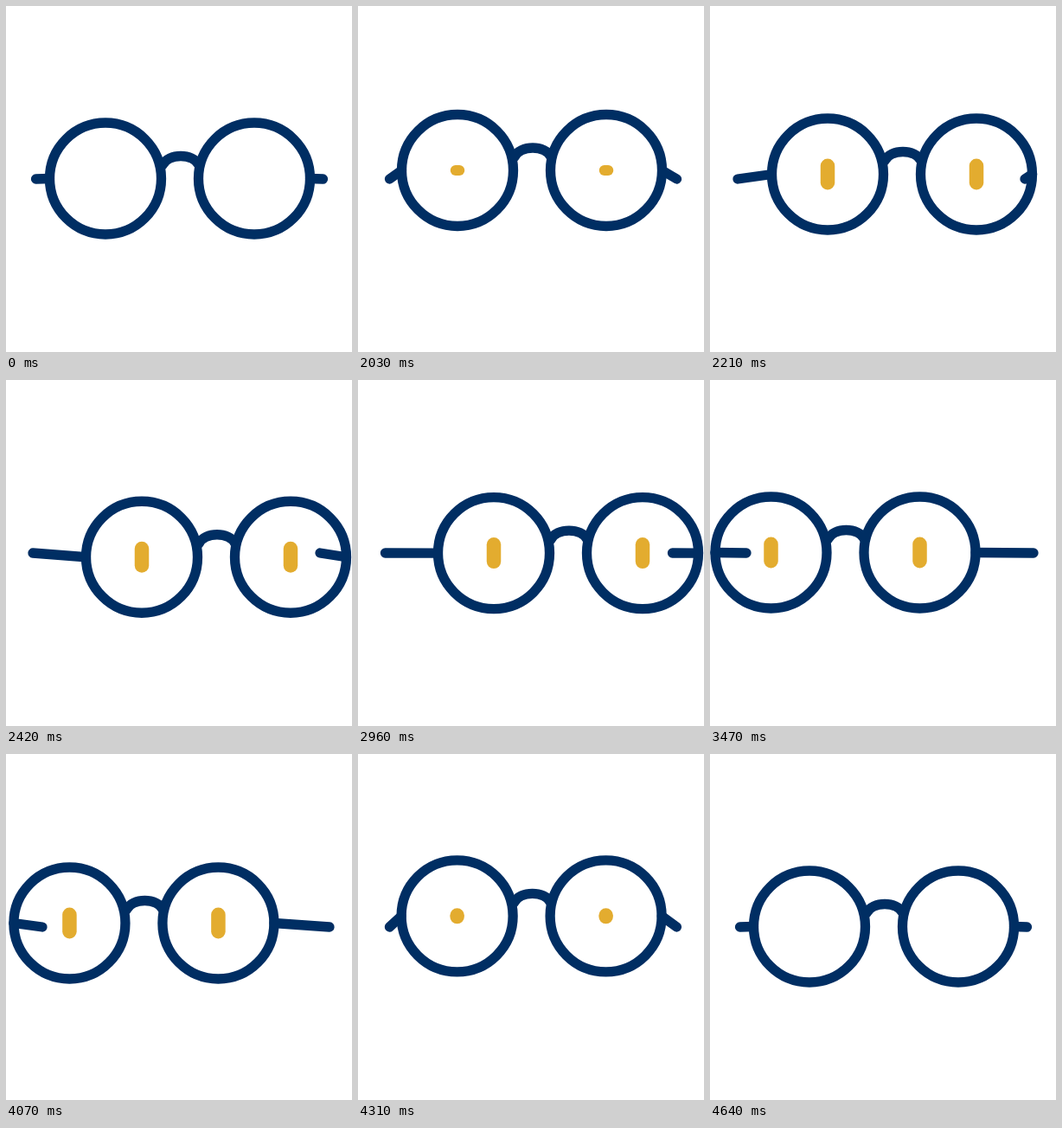
Write an HTML page that moves like this. It is 400 px wide and 400 px high and loops after 4.67 s.

```html
<!DOCTYPE html>
<html>
<head>
<meta charset="utf-8">
<style>
html, body { margin: 0; height: 100%; overflow: hidden; background: #fff; }
svg { display: block; width: 100vw; height: 100vh; }
</style>
</head>
<body>
<svg viewBox="0 0 400 400">
  <g fill="none" stroke="#002e63" stroke-width="11.3" stroke-linecap="round">
    <g id="frame">
      <circle cx="115" cy="199.5" r="64.5"/>
      <circle cx="287" cy="199.5" r="64.5"/>
      <path d="M181 184C187 170 217 170 223 184"/>
    </g>
    <path id="arms"/>
  </g>
  <g fill="#e3ac2f">
    <rect class="pupil" width="16.5"/>
    <rect class="pupil" width="16.5"/>
  </g>
</svg>
<script>
const LOOP = 4670, START = 2030, STEP = 30;
const frame = document.getElementById('frame');
const arms = document.getElementById('arms');
const pupils = document.querySelectorAll('.pupil');

// Keys are [step, value]
const lift = [[-1, 0], [0, -9.5], [2, -22], [6, -5], [9, 10.5], [17, 0], [30, 0],
  [38, 13.5], [40, 10.5], [43, -5], [48, 0], [62, 0], [68, -4], [73, -22],
  [80, 6], [81, 7], [87, 0]];
const ears = [[-1, 0], [0, 2], [6, -2.5], [9, -4], [17, -3], [30, -3], [40, -4],
  [48, 7.5], [68, 7.5], [80, 0]];
const open = [[-1, 0], [0, 12], [2, 36], [35, 36], [38, 10], [40, 28], [42, 36],
  [74, 36], [78, 0]];

// Smooth curve through the keys, without overshoot
function curve(keys, x) {
  const last = keys.length - 1;
  if (x <= keys[0][0]) return keys[0][1];
  if (x >= keys[last][0]) return keys[last][1];
  const slope = i => i < 0 || i >= last ? 0 :
    (keys[i + 1][1] - keys[i][1]) / (keys[i + 1][0] - keys[i][0]);
  const tangent = i => {
    const a = slope(i - 1), b = slope(i);
    return a * b > 0 ? 2 * a * b / (a + b) : 0;
  };
  const i = keys.findIndex(k => k[0] > x) - 1;
  const [x0, y0] = keys[i], [x1, y1] = keys[i + 1];
  const w = x1 - x0, u = (x - x0) / w, v = 1 - u;
  return y0 * v * v * (1 + 2 * u) + y1 * u * u * (3 - 2 * u) +
    w * u * v * (tangent(i) * v - tangent(i + 1) * u);
}

function ease(k, from, steps) {
  const p = Math.min(1, Math.max(0, (k - from) / steps));
  return p < 0.5 ? 16 * p ** 5 : 1 - 16 * (1 - p) ** 5;
}

function draw(now) {
  const k = Math.max(-1, Math.floor((now % LOOP - START) / STEP));
  const dx = 42 * ease(k, -1, 14) - 86.5 * ease(k, 30, 18) + 44.5 * ease(k, 62, 18);
  const dy = curve(lift, k), ear = curve(ears, k), h = curve(open, k);
  const y = 199.5 + dy;
  frame.setAttribute('transform', `translate(${dx} ${dy})`);
  arms.setAttribute('d',
    `M${34.5 + ear} 200L${50.5 + dx} ${y}M${366.5 + ear} 200L${351.5 + dx} ${y}`);
  pupils.forEach((p, i) => {
    p.setAttribute('x', 106.75 + 172 * i + dx);
    p.setAttribute('y', y - h / 2);
    p.setAttribute('height', h);
    p.setAttribute('rx', Math.min(8.25, h / 2));
  });
}

const begin = performance.now();
(function tick() {
  draw(performance.now() - begin);
  requestAnimationFrame(tick);
})();
</script>
</body>
</html>
```
